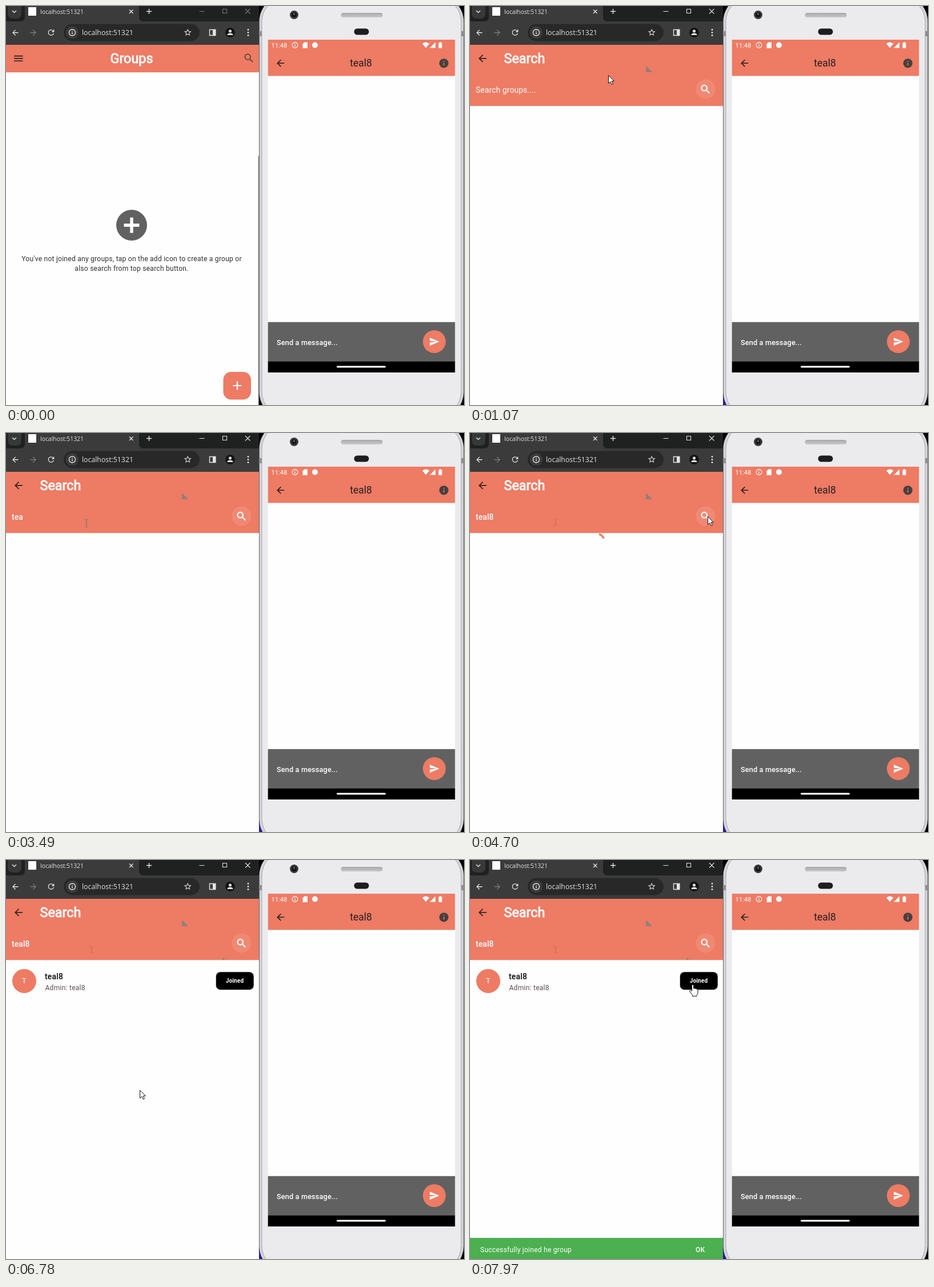
Animation, 802 px wide and 699 px high, one loop 8 s. Source, as an HTML page:

```html
<!DOCTYPE html>
<html lang="en">
<head>
<meta charset="utf-8">
<title>Join a group</title>
<style>
html, body { margin: 0; width: 100%; height: 100%; overflow: hidden; background: #000; }
svg { display: block; width: 802px; height: 699px; font: 12.12px Roboto, sans-serif; letter-spacing: .22px; }
.chrome { font-family: "Open Sans", sans-serif; letter-spacing: 0; }
.title { font-size: 23.4px; letter-spacing: 0; fill: #fff; stroke: #fff; stroke-width: .9px; }
.field { font-size: 13.84px; letter-spacing: .13px; }
.btn { font-size: 10px; font-weight: 700; letter-spacing: .15px; }
.mid { text-anchor: middle; }
</style>
</head>
<body>
<svg viewBox="0 0 802 699">
  <defs>
    <symbol id="search" viewBox="0 0 24 24"><path d="M15.5 14h-.79l-.28-.27A6.47 6.47 0 0 0 16 9.5 6.5 6.5 0 1 0 9.5 16c1.61 0 3.09-.59 4.23-1.57l.27.28v.79l5 4.99L20.49 19zm-6 0a4.5 4.5 0 1 1 0-9 4.5 4.5 0 0 1 0 9z"/></symbol>
    <symbol id="back" viewBox="0 0 24 24"><path d="M20 11H7.83l5.59-5.59L12 4l-8 8 8 8 1.41-1.41L7.83 13H20z"/></symbol>
    <symbol id="add" viewBox="0 0 24 24"><path d="M19 13h-6v6h-2v-6H5v-2h6V5h2v6h6z"/></symbol>
    <symbol id="info" viewBox="0 0 24 24"><path d="M12 2a10 10 0 1 0 0 20 10 10 0 0 0 0-20zm1 15h-2v-6h2zm0-8h-2V7h2z"/></symbol>
    <symbol id="reload" viewBox="0 0 24 24"><path d="M17.65 6.35A7.96 7.96 0 0 0 12 4a8 8 0 1 0 7.73 10h-2.08A6 6 0 1 1 12 6c1.66 0 3.14.69 4.22 1.78L13 11h7V4z"/></symbol>
    <symbol id="star" viewBox="0 0 24 24"><path d="M22 9.24l-7.19-.62L12 2 9.19 8.63 2 9.24l5.46 4.73L5.82 21 12 17.27 18.18 21l-1.63-7.03zM12 15.4l-3.76 2.27 1-4.28-3.32-2.88 4.38-.38L12 6.1l1.71 4.04 4.38.38-3.32 2.88 1 4.28z"/></symbol>
    <symbol id="send" viewBox="0 0 24 24"><path d="M2 21l21-9L2 3v7l15 2-15 2z"/></symbol>
    <linearGradient id="slot" x2="0" y2="1"><stop stop-color="#a8a8a8"/><stop offset="1" stop-color="#c9c9c9"/></linearGradient>
    <clipPath id="page"><path d="M0 68h443v631H0z"/></clipPath>
  </defs>

  <!-- phone -->
  <path id="corner" d="M443 684h14v15h-14z" fill="#2d1a90"/>
  <rect x="443.500" y="-18" width="358" height="739.500" rx="45" fill="#d3d3d8"/>
  <path d="M443 44h5v9h-5zM797 44h5v9h-5z" fill="#8b8b90"/>
  <rect x="448" y="-14" width="349" height="731" rx="41" fill="#ebebed" stroke="#a9a9af"/>
  <rect x="586.500" y="12" width="73" height="8" rx="4" fill="url(#slot)"/>
  <circle cx="504.500" cy="15.500" r="7.500" fill="#3b3b3e"/>
  <circle cx="504.500" cy="15.500" r="4.500" fill="#161619"/>
  <circle cx="504.500" cy="14" r="1.500" fill="#77777c"/>
  <rect x="609.500" y="39.500" width="26" height="11" rx="5.500" fill="#1d1d1f"/>
  <path d="M458.700 59h327.600v583h-327.600z" fill="#fefefe"/>
  <path d="M458.700 59h327.600v63.400h-327.600z" fill="#ee7b64"/>
  <path d="M458.700 553.700h327.600v70h-327.600z" fill="#616161"/>
  <path d="M458.700 622.700h327.600v19.200h-327.600z"/>
  <rect x="579" y="630.500" width="86" height="3" rx="1.500" fill="#fff"/>
  <g fill="#fff">
    <text x="464.500" y="73" font-size="11.200" letter-spacing="0">11:48</text>
    <circle cx="506" cy="68.500" r="4.800" fill="none" stroke="#fff" stroke-width="1.200"/>
    <path d="M505.400 67.800h1.200v3.400h-1.200zM505.400 65.600h1.200v1.200h-1.200z"/>
    <path d="M522.500 63.500h5.500v10.500h-8.500v-7.500z"/>
    <circle cx="541" cy="68.500" r="5"/>
    <path d="M729 66q6.200-5 12.400 0l-6.200 7.500zM752 63.500v10h-10zM757.500 64.500h1.700v-1.200h2.600v1.200h1.700v9.200h-6z"/>
    <text x="474" y="593.500" font-size="12.750" font-weight="500" letter-spacing=".12">Send a message...</text>
  </g>
  <use href="#back" x="471" y="90.500" width="19.500" height="19.500" fill="#25201f"/>
  <use href="#info" x="757" y="90.500" width="19.500" height="19.500" fill="#46413f"/>
  <text class="mid name" x="621.500" y="106" font-size="17.530" letter-spacing="0" fill="#25201f"></text>
  <circle cx="750" cy="588" r="20" fill="#ee7b64"/>
  <use href="#send" x="740.500" y="578.500" width="19" height="19" fill="#fff"/>

  <!-- browser frame -->
  <path d="M0 0h443v68H0z" fill="#1f2020"/>
  <path d="M0 27h25q8 0 8-8V0h200v19q0 8 8 8h202v41H0z" fill="#3b3b3b"/>
  <rect x="3" y="-6" width="24" height="28" rx="8" fill="#373838"/>
  <rect x="101" y="31.500" width="238" height="30" rx="15" fill="#282828"/>
  <circle cx="116" cy="46.500" r="11" fill="#3b3b3b"/>
  <path d="M39 2h14v15H39z" fill="#fff"/>
  <g fill="none" stroke="#e3e3e3" stroke-width="1.400">
    <path d="M11 8l3.500 3.500L18 8M216 6.500l6.500 6.500m0-6.500l-6.500 6.500M246 9.500h9m-4.500-4.500v9"/>
    <circle cx="116" cy="46.500" r="5.500"/>
    <path d="M116 45.700v3.800m0-6v1.300M356.500 41.500h10v10h-10z"/>
    <path id="controls" d="M338.500 9.500h9M379.500 5.500h7v7h-7zM419 5l8.500 8.500m0-8.500l-8.500 8.500" stroke-width="1.100"/>
  </g>
  <g fill="#e3e3e3">
    <path d="M362 41h5.500v11H362z"/>
    <circle cx="392.500" cy="46.500" r="8.500" fill="#151515"/>
    <circle cx="392.500" cy="44" r="2.500"/><path d="M387.500 51q0-3.500 5-3.500t5 3.500z"/>
    <circle cx="424" cy="41.500" r="1.400"/><circle cx="424" cy="46.500" r="1.400"/><circle cx="424" cy="51.500" r="1.400"/>
    <use href="#back" x="8.500" y="39" width="15.500" height="15.500"/>
    <use href="#back" transform="translate(55.500 39) scale(-1 1)" width="15.500" height="15.500" fill="#7b7b7b"/>
    <use href="#reload" x="71" y="38.500" width="16" height="16"/>
    <use href="#star" x="310.500" y="38.500" width="15.500" height="15.500"/>
    <text class="chrome" x="60" y="14" font-size="10.400">localhost:51321</text>
    <text class="chrome" x="133" y="51" font-size="12.300">localhost:51321</text>
  </g>

  <g clip-path="url(#page)">
    <!-- groups page -->
    <path d="M0 68h443v631H0z" fill="#fefefe"/>
    <path d="M0 68h443v48.300H0z" fill="#ee7b64"/>
    <path d="M14 86.800h15.500v1.700H14zm0 4.300h15.500v1.700H14zm0 4.300h15.500v1.700H14z" fill="#2a211f"/>
    <text class="title mid" x="220" y="100">Groups</text>
    <use href="#search" x="415" y="81" width="20.800" height="20.800" fill="#51403c"/>
    <circle cx="220" cy="384" r="27" fill="#616161"/>
    <path d="M217.300 370.500h5.400v10.800h10.800v5.400h-10.800v10.800h-5.400v-10.800h-10.800v-5.400h10.800z" fill="#fff"/>
    <g class="mid" fill="#303030">
      <text x="220" y="446.500">You've not joined any groups, tap on the add icon to create a group or</text>
      <text x="220" y="464">also search from top search button.</text>
    </g>
    <rect x="380.500" y="641" width="48.500" height="48.500" rx="13.800" fill="#ee7b64"/>
    <use href="#add" x="392" y="652" width="26" height="26" fill="#fff"/>
    <path id="edge" d="M441.500 263h1.500v436h-1.500z" fill="#8b8b8b"/>

    <!-- search page -->
    <g id="finder">
      <path d="M0 68h443v631H0z" fill="#fefefe"/>
      <path d="M0 68h443v107.300H0z" fill="#ee7b64"/>
      <use href="#back" x="11.500" y="81.500" width="20.800" height="20.800" fill="#33231f"/>
      <text class="title" x="59.500" y="100">Search</text>
      <path d="M308 105v11h11z" fill="#8f7f7d"/>
      <text id="query" class="field" x="10" y="151.500" fill="#fff"></text>
      <circle cx="412.500" cy="145.500" r="17" fill="#fff" fill-opacity=".1"/>
      <use href="#search" x="402" y="135.500" width="20.800" height="20.800" fill="#fff" stroke="#fff" stroke-width=".5"/>
      <path id="beamTrail" d="M147 151.500h2m2 0h2m-3 1v9m-3 1h2m2 0h2" fill="none" stroke="#c66b59"/>
      <path id="tipTrail" d="M379 171v4h5z" fill="#a9766c"/>
      <circle id="spinner" cx="221.500" cy="190.500" r="14" pathLength="360" fill="none" stroke="#ee7b64" stroke-width="3.400"/>
      <g id="row">
        <circle cx="32" cy="212" r="21" fill="#ee7b64"/>
        <text class="mid" x="32" y="216" font-size="13" fill="#fff">T</text>
        <text class="name" x="68" y="209" font-size="13.840" font-weight="500" fill="#1d1d1d" stroke="#1d1d1d" stroke-width=".2"></text>
        <text x="68.500" y="228" fill="#5c4f4f">Admin: <tspan class="name"></tspan></text>
        <g id="join">
          <rect x="356" y="196" width="78.500" height="31.500" rx="8" fill="#ee7b64"/>
          <text class="btn mid" x="395" y="215.300" fill="#fff">Join Now</text>
        </g>
        <g id="joined">
          <rect x="367.500" y="196" width="66.500" height="31.500" rx="8" stroke="#ddd" stroke-width=".7"/>
          <text class="btn mid" x="400.500" y="215.300" fill="#fff">Joined</text>
        </g>
      </g>
      <g id="snack">
        <path d="M0 0h443v42H0z" fill="#4caf50"/>
        <g id="snackText" fill="#fff">
          <text x="18" y="25">Successfully joined he group</text>
          <text x="395" y="25" font-weight="500">OK</text>
        </g>
      </g>
    </g>
  </g>

  <!-- pointers, each with its hot spot at 0,0 -->
  <g id="pointer" stroke-linejoin="round">
    <path id="arrow" d="M.5.500v14l3.300-3 2.300 5 2.300-1-2.300-4.900h4.300z" fill="#fff" stroke="#111"/>
    <path id="beam" d="M-3-6.500h2.200m1.600 0H3M0-5.500v11M-3 6.500h2.200m1.600 0H3" fill="none" stroke="#64767c" stroke-width="1.200"/>
    <path id="hand" d="M-1.500 11V1.200Q-1.500-.3 0-.3T1.500 1.200V6.500Q3 5.500 4.200 7 6 6 6.800 7.700 9 7 9 9.500v4.500Q9 17 7 18v2H-.5v-2l-5-6.500q.2-2 2-1.500z" fill="#fff" stroke="#111"/>
  </g>
</svg>
<script>
const LOOP = 8000, NAME = "teal8", HINT = "Search groups....";
const KEY_TIMES = [2300, 2760, 2960, 3560, 3700];
// pointer stops: time, x, y
const PATH = [
  [110, 690, 420], [480, 520, 260], [820, 425, 91], [930, 424, 92], [1070, 242, 121],
  [1400, 170, 140], [1700, 139, 157], [2100, 139, 157], [2200, 141, 158], [3760, 141, 158],
  [3850, 150, 157], [4150, 427, 170], [4300, 416, 146], [4830, 416, 146], [5120, 405, 162],
  [5550, 380, 172], [5880, 386, 207], [6020, 386.500, 207], [6290, 386.500, 207],
  [6720, 226, 405], [7060, 321, 378], [7130, 325, 370], [7550, 388, 208.500],
  [7750, 388, 208.500], [7970, 390, 218.500]
];
const $ = id => document.getElementById(id);
const show = (id, on) => $(id).style.display = on ? "" : "none";
const clamp = v => Math.min(1, Math.max(0, v));
const ease = v => v * v * (3 - 2 * v);

document.querySelectorAll(".name").forEach(el => el.textContent = NAME);

function pointerAt(t) {
  let i = PATH.findIndex(p => p[0] > t);
  if (i < 0) return PATH[PATH.length - 1].slice(1);
  if (!i) i = 1;
  const [a, b] = [PATH[i - 1], PATH[i]];
  const k = ease(clamp((t - a[0]) / (b[0] - a[0])));
  return [a[1] + (b[1] - a[1]) * k, a[2] + (b[2] - a[2]) * k];
}

function drawPointer(t, joined) {
  const [x, y] = pointerAt(t);
  const inField = t > 1070 && x < 385 && y > 132 && y < 167;
  const onButton = t > 4900 && x > (joined ? 367 : 356) && x < 434 && y > 196 && y < 227;
  show("pointer", t >= 110);
  $("pointer").setAttribute("transform", `translate(${x} ${y})`);
  show("beam", inField);
  show("hand", onButton);
  show("arrow", !inField && !onButton);
}

function draw(t) {
  const focused = t >= 500, joined = t >= 6500;
  $("controls").style.opacity = focused ? 1 : .45;
  show("corner", focused);
  show("edge", !focused);

  show("finder", t >= 930);
  $("finder").style.opacity = clamp((t - 900) / 150);
  const typed = KEY_TIMES.filter(k => t >= k).length;
  $("query").textContent = typed ? NAME.slice(0, typed) : HINT;
  $("query").style.fontWeight = typed ? 500 : 400;
  show("beamTrail", t >= 3850);
  show("tipTrail", t >= 5600);

  show("spinner", t >= 4370 && t < 4900);
  const sweep = 48 + (t - 4700) * .12;
  $("spinner").setAttribute("stroke-dasharray", `${sweep} ${360 - sweep}`);
  $("spinner").setAttribute("transform", `rotate(${(t - 4700) * .4 - 72} 221.5 190.5)`);
  show("row", t >= 4900);
  show("join", !joined);
  show("joined", joined);

  const rise = clamp((t - 7720) / 250);
  show("snack", rise > 0);
  $("snack").setAttribute("transform", `translate(0 ${699 - 37 * (1 - (1 - rise) ** 2)})`);
  $("snackText").style.opacity = clamp(rise * 2 - 1);
  drawPointer(t, joined);
}

function tick() {
  draw(performance.now() % LOOP);
  requestAnimationFrame(tick);
}
tick();
</script>
</body>
</html>
```
